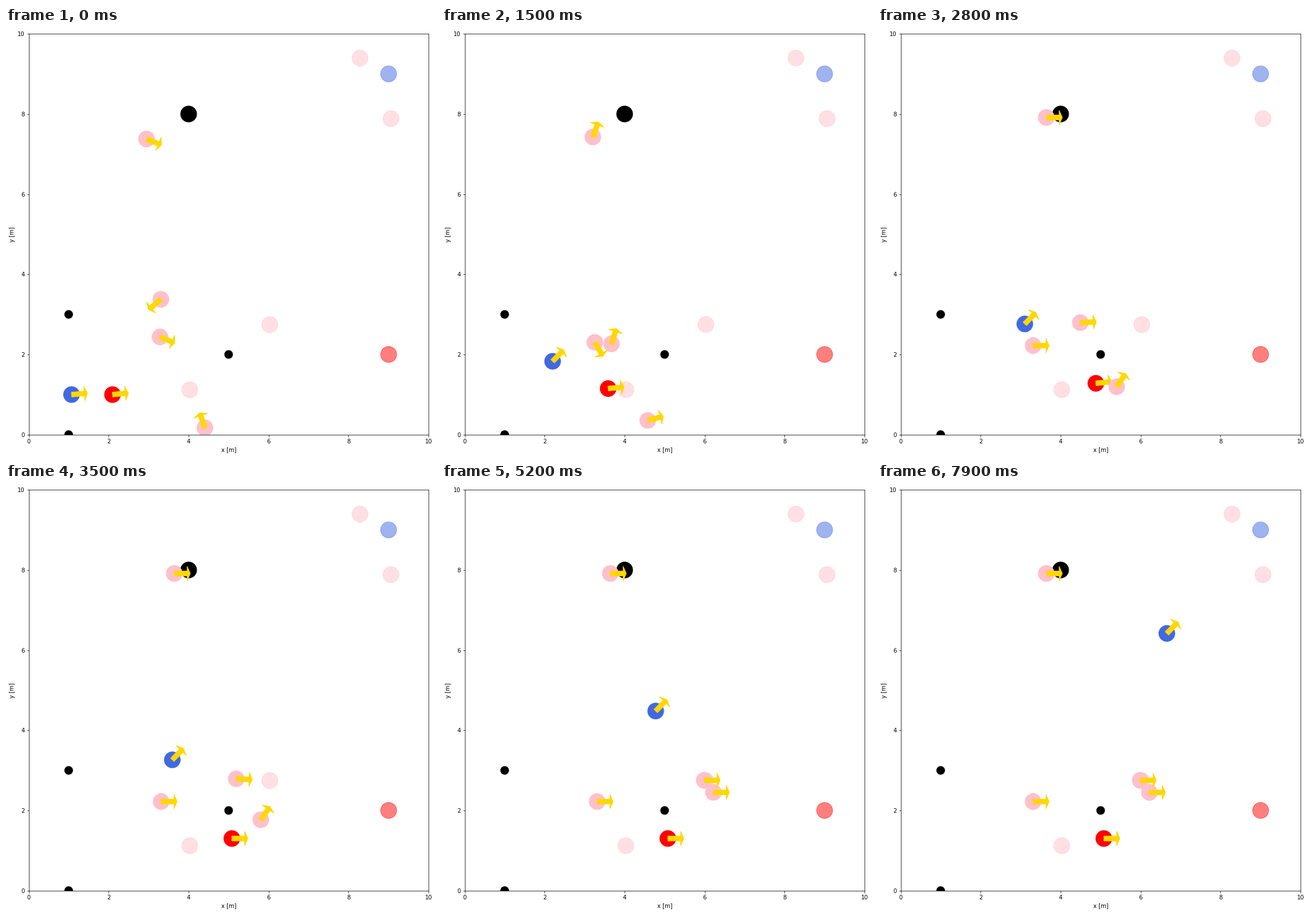
Recreate the animation shown at these times as a matplotlib script. Size 751 by 746 pixels, loop 8 s.

```python
import numpy as np
import matplotlib.pyplot as plt
from matplotlib.animation import FuncAnimation
from matplotlib.patches import Circle, Polygon

W, H, DPI = 751, 746, 72
STEPS, STEP_MS = 80, 100
LEFT, BOTTOM, SIDE = 39.6, 37.3, 698.5
RADIUS = 0.2
ARROW_LEN, ARROW_WIDTH = 0.4, 0.6

plt.rcParams["font.family"] = "DejaVu Sans"
plt.rcParams["font.size"] = 10

# Each robot: colour and key poses (step, x, y, heading in degrees).
ROBOTS = [
    ("royalblue", [(0, 1.072, 0.998, 5), (9, 1.782, 1.398, 46),
                   (79, 6.655, 6.417, 46)]),
    ("red", [(0, 2.096, 0.998, 5.8), (30, 5.080, 1.300, 5.8)]),
    ("pink", [(0, 2.947, 7.376, -22), (15, 3.205, 7.426, 70),
              (24, 3.642, 7.913, 25)]),
    ("pink", [(0, 4.407, 0.168, 109), (15, 4.579, 0.354, 15),
              (28, 5.402, 1.194, 56), (43, 6.218, 2.451, 64)]),
    ("pink", [(0, 3.283, 2.437, -22), (15, 3.670, 2.265, 72),
              (28, 4.493, 2.795, 3), (43, 5.989, 2.752, -1)]),
    ("pink", [(0, 3.306, 3.375, -140), (15, 3.255, 2.301, -60),
              (17, 3.312, 2.222, -55)]),
]
GOALS = [(9, 9, "royalblue"), (9, 2, "red"), (8.285, 9.397, "pink"),
         (9.06, 7.884, "pink"), (6.03, 2.745, "pink"), (4.03, 1.12, "pink")]
OBSTACLES = [(1, 0, 0.1), (1, 3, 0.1), (5, 2, 0.1), (4, 8, 0.2)]

ARROW = np.array([[0, .1], [0, -.1], [.8, -.1], [.8, -.3],
                  [1, 0], [.8, .3], [.8, .1]]) * [ARROW_LEN, ARROW_WIDTH]


def direction(angle):
    return np.array([np.cos(angle), np.sin(angle)])


def glide(a, b, step):
    """Cubic Hermite between two key poses: position and travel angle."""
    u = (step - a[0]) / (b[0] - a[0])
    p, q = np.array(a[1:3]), np.array(b[1:3])
    reach = np.hypot(*(q - p))
    m, n = (reach * direction(np.radians(k[3])) for k in (a, b))
    pos = (p + (q - p) * u * u * (3 - 2 * u)
           + m * u * (1 - u) ** 2 - n * u * u * (1 - u))
    vel = (6 * u * (1 - u) * (q - p)
           + m * (1 - u) * (1 - 3 * u) + n * u * (3 * u - 2))
    return pos, np.arctan2(vel[1], vel[0])


def pose(keys, step):
    """Robots halt after the last key and then face along x."""
    if step > keys[-1][0]:
        return np.array(keys[-1][1:3]), 0.0
    for a, b in zip(keys, keys[1:]):
        if step <= b[0]:
            return glide(a, b, step)


class Robot:
    def __init__(self, ax, color, keys):
        self.keys = keys
        self.body = ax.add_patch(Circle((0, 0), RADIUS, color=color))
        self.arrow = ax.add_patch(Polygon(ARROW, closed=True, color="gold"))

    def move(self, step):
        pos, angle = pose(self.keys, step)
        c, s = direction(angle)
        self.body.center = pos
        self.arrow.set_xy(ARROW @ np.array([[c, s], [-s, c]]) + pos)


fig = plt.figure(figsize=(W / DPI, H / DPI), dpi=DPI, facecolor="white")
ax = fig.add_axes([LEFT / W, BOTTOM / H, SIDE / W, SIDE / H])
ax.set(xlim=(0, 10), ylim=(0, 10), xlabel="x [m]", ylabel="y [m]",
       xticks=range(0, 11, 2), yticks=range(0, 11, 2))

for x, y, color in GOALS:
    ax.add_patch(Circle((x, y), RADIUS, color=color, alpha=0.5))
for x, y, r in OBSTACLES:
    ax.add_patch(Circle((x, y), r, color="black"))

robots = [Robot(ax, color, keys) for color, keys in ROBOTS]


def update(step):
    for robot in robots:
        robot.move(step)
    return []


anim = FuncAnimation(fig, update, frames=STEPS, interval=STEP_MS,
                     repeat=True, repeat_delay=0, blit=False)
plt.show()
```
